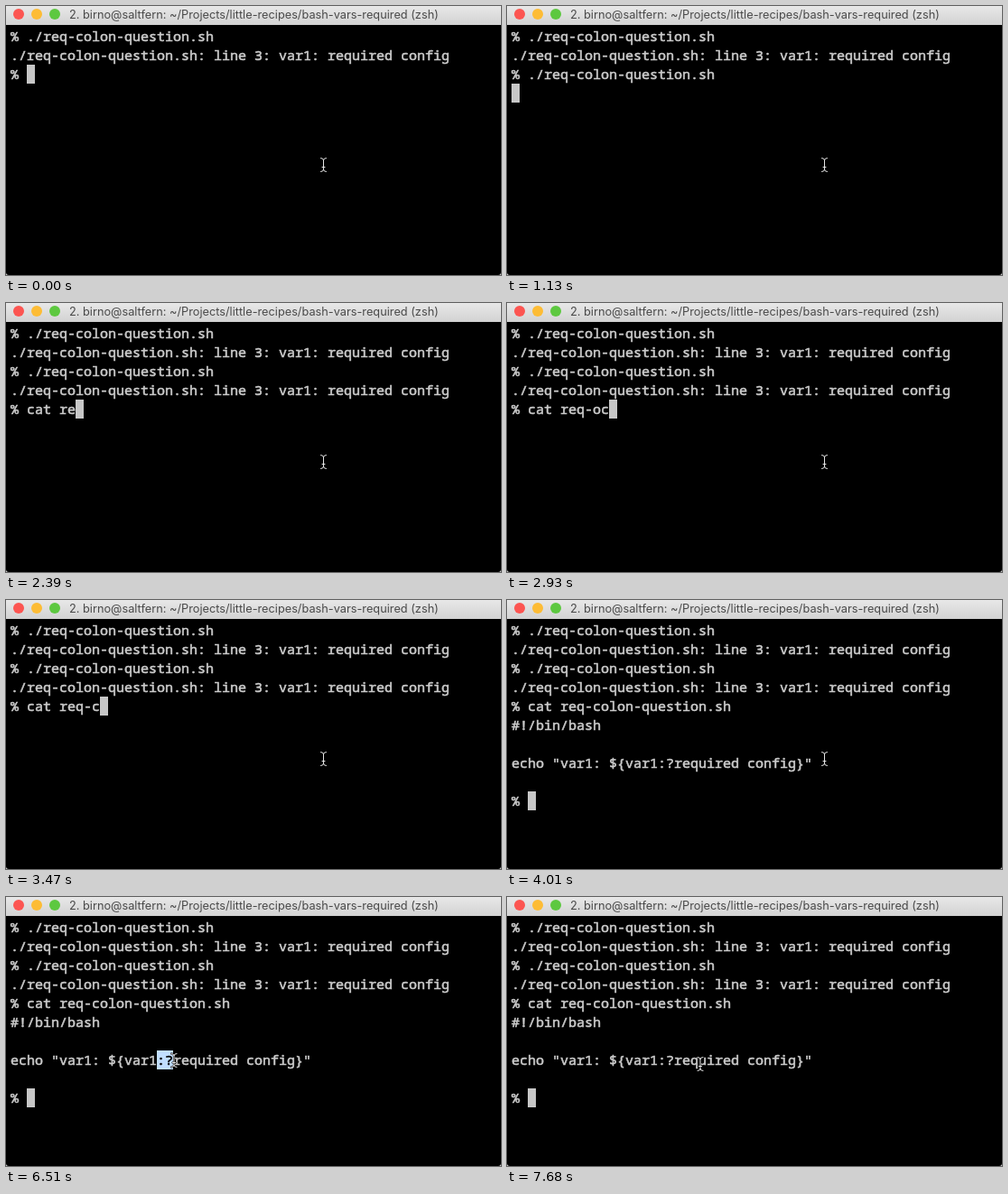
Recreate the animation shown at these times as an HTML page. Size 548x298 px, loop 8000 ms.

```html
<!DOCTYPE html>
<html lang="en">
<head>
<meta charset="utf-8">
<title>Terminal</title>
<style>
  html, body { margin: 0; width: 100%; height: 100%; overflow: hidden; background: #d8d8d8; }
  #stage {
    position: relative; width: 548px; height: 298px; overflow: hidden;
    background: #000; border-radius: 0 0 3px 3px;
  }
  #bar {
    position: absolute; inset: 0 0 auto; height: 21px;
    background: linear-gradient(#e8e8e8, #d2d2d2);
  }
  #bar i { position: absolute; top: 3px; width: 12px; height: 12px; border-radius: 50%; }
  #bar span {
    position: absolute; left: 70px; top: 0; white-space: pre;
    font: 12.75px/19px Inter, Roboto, sans-serif; color: #4a4a4a;
  }
  #screen {
    position: absolute; left: 5px; top: 23px; margin: 0; color: #cbcbcb;
    font: 15px/21px "Noto Sans Mono", "DejaVu Sans Mono", monospace;
    -webkit-text-stroke: .6px currentColor; font-variant-ligatures: none;
  }
  #mark, #caret { display: inline-block; height: 21px; vertical-align: top; }
  #mark { background: #c1deff; color: #000; }
  #caret { width: 9px; background: #c7c7c7; }
  #beam { position: absolute; left: -5px; top: -9px; }
</style>
</head>
<body>
<div id="stage">
  <div id="bar">
    <i style="left:8px;background:#fc5551"></i>
    <i style="left:28px;background:#fdbc35"></i>
    <i style="left:48px;background:#5dc840"></i>
    <span>2. birno@saltfern: ~/Projects/little-recipes/bash-vars-required (zsh)</span>
  </div>
  <pre id="screen"><span id="head"></span><span id="mark"></span><span id="tail"></span><span id="caret"></span></pre>
  <svg id="beam" width="10" height="18" fill="none" stroke-linecap="round">
    <defs>
      <path id="ibeam" d="M2 1.5Q5 1.5 5 4Q5 1.5 8 1.5M5 4V14M2 16.5Q5 16.5 5 14Q5 16.5 8 16.5M3.5 11.5H6.5"/>
    </defs>
    <use href="#ibeam" stroke="#000" stroke-width="2.2"/>
    <use href="#ibeam" stroke="#e6e6e6"/>
  </svg>
</div>
<script>
  const LOOP = 8000, START = 500, TICK = 89.7;
  const CELL = 9, MARK_X = 167;
  const [head, mark, tail, beam] =
    ['head', 'mark', 'tail', 'beam'].map(id => document.getElementById(id));

  const file = 'req-colon-question.sh';
  const error = `./${file}: line 3: var1: required config\n% `;
  const listing = '#!/bin/bash\n\necho "var1: ${var1:?required config}"\n\n% ';
  const opening = `% ./${file}\n${error}`;

  // Keys pressed per tick: ⇥ completes a name, ⌫ deletes, ⏎ ends the line, = prints the output.
  const keys = '.|||⇥||||⏎|=||||||||c|a|t| ||re|q||-||o|c||||⌫|⌫|c|o|⇥||||⏎='.split('|');

  function press(text, key) {
    if (key === '⌫') return text.slice(0, -1);
    if (key === '⏎') return text + '\n';
    if (key === '=') return text + (text.includes('cat') ? listing : error);
    if (key === '⇥') {
      const from = text.lastIndexOf(' ') + 1;
      const name = [`./${file}`, `${file} `].find(n => n.startsWith(text.slice(from)));
      return text.slice(0, from) + name;
    }
    return text + key;
  }

  const typed = tick => [...keys.slice(0, tick + 1).join('')].reduce(press, opening);

  // Pointer sweeps: each eases along a curve from where the last one ended.
  const home = [351.5, 176];
  const sweeps = [
    { begin: 47, steps: 5, bend: [290, 398], end: [201, 185] },
    { begin: 53, steps: 6, bend: [186.5, 181], end: [172, 180] },
    { begin: 61, steps: 6, bend: [179, 180], end: [186, 181] },
    { begin: 70, steps: 5, bend: [350, 241], end: [214, 185] }
  ];

  function pointer(tick) {
    return sweeps.reduce((from, { begin, steps, bend, end }) => {
      const p = Math.min(1, Math.max(0, (tick - begin) / steps));
      const e = p * (2 - p), r = 1 - e;
      return from.map((v, i) => r * r * v + 2 * r * e * bend[i] + e * e * end[i]);
    }, home);
  }

  // The drag selects the cells the pointer crosses; a later click clears them.
  function selected(tick) {
    if (tick < 62 || tick >= 80) return 0;
    return Math.round((pointer(Math.min(tick, 67))[0] - MARK_X) / CELL);
  }

  let shown;
  function draw(t) {
    const tick = Math.max(-1, Math.floor((t - START) / TICK));
    if (tick === shown) return;
    shown = tick;

    const text = typed(tick), count = selected(tick), [x, y] = pointer(tick);
    const from = count ? text.lastIndexOf(':?') : text.length;
    head.textContent = text.slice(0, from);
    mark.textContent = text.slice(from, from + count);
    tail.textContent = text.slice(from + count);
    mark.style.display = count ? '' : 'none';
    beam.style.transform = `translate(${x}px, ${y}px)`;
  }

  const start = performance.now();
  function frame() {
    draw((performance.now() - start) % LOOP);
    requestAnimationFrame(frame);
  }
  frame();
</script>
</body>
</html>
```
